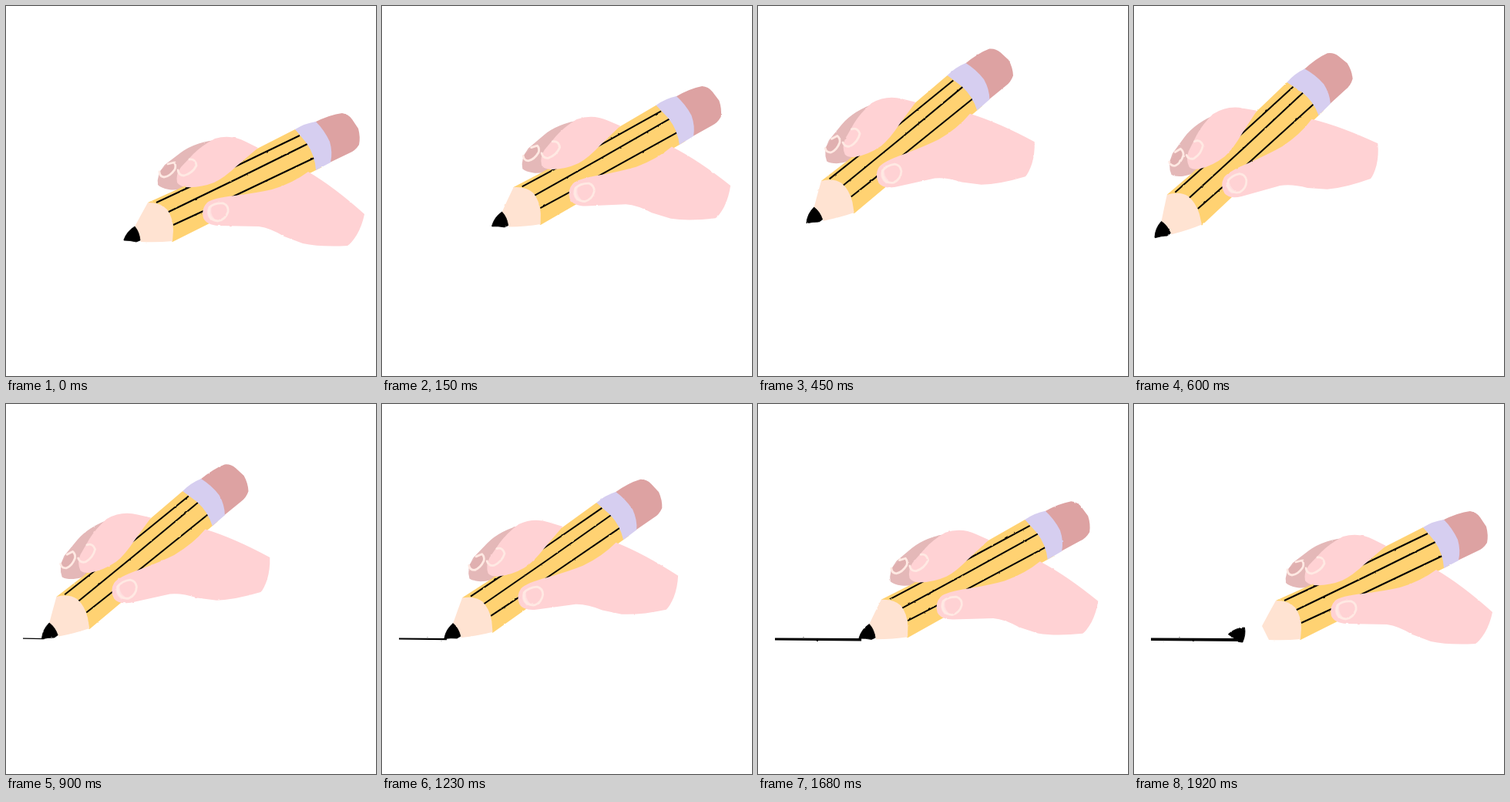
An HTML page for the animation above (2700 ms loop, 480 by 480 pixels).

```html
<!DOCTYPE html>
<html lang="en">
<head>
<meta charset="utf-8">
<title>Pencil line</title>
<style>
  html, body { margin: 0; width: 100%; height: 100%; overflow: hidden; background: #fff; }
  svg { display: block; width: 100vw; height: 100vh; }
  .skin { fill: #ffd2d4; }
  .nail { fill: none; stroke: #ffe9e3; stroke-width: 2.8; stroke-linecap: round; stroke-linejoin: round; }
</style>
</head>
<body>
<svg viewBox="0 0 480 480">
  <filter id="rough" filterUnits="userSpaceOnUse" x="0" y="0" width="480" height="480" color-interpolation-filters="sRGB">
    <feTurbulence type="fractalNoise" baseFrequency=".16" numOctaves="2" seed="4"/>
    <feDisplacementMap in="SourceGraphic" scale="1.8" xChannelSelector="R" yChannelSelector="G"/>
  </filter>
  <g filter="url(#rough)">
    <path id="line"/>
    <g id="hand">
      <!-- middle finger -->
      <path fill="#e4b8b8" d="M197 232Q195 219 206 206L227 190Q246 176 278 173L262 226L238 234Q224 240 211 238Q201 236 197 232Z"/>
      <path class="nail" style="fill:#e0b0b0" d="M210 205L218 203Q221 207 219 212Q213 221 205 222Q199 221 199 215"/>
      <!-- pencil -->
      <path fill="#ffd272" d="M184 255L222 238L375 160L396 172L410 209L402 213L216 306L196 290Z"/>
      <path fill="none" stroke="#000" stroke-width="2" d="M195 255L240 234L300 207L381 168M209 268L300 224L391 179M217 284L256 266L297 246L400 197"/>
      <path fill="#ffe3d2" d="M184 255Q201 255 209 264Q217 275 217 291L216 305Q197 307 175 306L166 288Q175 271 184 255Z"/>
      <path fill="#dda2a2" d="M400 151Q420 141 436 139Q444 140 449 147L457 159Q460 170 458 180Q453 188 445 191L420 203Z"/>
      <path fill="#d6cef0" d="M375 160Q388 152 402 150Q413 161 420 176Q424 190 421 203L402 213Q401 194 390 178Z"/>
      <!-- index finger, thumb and palm -->
      <path class="skin" d="M222 229Q220 218 227 209L243 192Q254 181 271 172Q292 166 311 176L327 184L300 207Q283 223 270 229Q252 236 234 235Q225 234 222 229Z"/>
      <path class="skin" d="M256 275Q253 263 261 255Q268 249 297 246Q328 242 345 238Q372 230 392 215Q426 235 465 270Q462 285 455 297Q448 308 443 311Q408 313 385 308L361 299Q343 288 328 286L276 285Q260 284 256 275Z"/>
      <path fill="#ffdfe0" d="M264 259Q257 268 265 278L271 277Q263 268 268 258Z"/>
      <path class="nail" d="M238 199Q246 198 247 207Q242 217 231 220Q224 220 223 213"/>
      <path class="nail" d="M264 261Q271 255 282 256Q289 259 288 267Q285 277 275 279Q264 278 263 268Z"/>
    </g>
    <path id="lead" stroke="#000" stroke-width=".8" stroke-linejoin="round" d="M153 303Q157 292 167 286Q173 293 174 304L169 306Q161 304 153 304Z"/>
  </g>
</svg>
<script>
const LOOP = 2700, TICK = 30;
const LIFT = 60, LAND = 630, ARRIVE = 1870, SNAP = 1740, REST = 1920;
const LEFT = 22, REACH = 131, TILT = 17.2;

const [line, hand, lead] = ["line", "hand", "lead"].map(id => document.getElementById(id));

const progress = (t, from, to) => Math.min(1, Math.max(0, (t - from) / (to - from)));
const smooth = u => u * u * (3 - 2 * u);
const mean = (a, b) => (a + b) / 2;

// The point hops left in an arc while the pencil tilts up.
function hop(u) {
  return {
    x: LEFT + REACH * (1 - mean(u ** 1.3, smooth(u))),
    y: 303 + u - 30 * Math.sin(Math.PI * u ** 0.85),
    angle: -TILT * mean(u, Math.sin(u * Math.PI / 2))
  };
}

// The point runs right along the line while the pencil leans back.
function stroke(u) {
  return { x: LEFT + REACH * u ** 1.1, y: 304 - u, angle: -TILT * (1 - u) };
}

// The broken lead falls back onto the line.
function tumble(u) {
  return { x: 149 - 14 * u, y: 298 + u - 4 * Math.sin(Math.PI * u), angle: 31 * u - 2 };
}

function place(el, { x, y, angle }, px, py) {
  el.setAttribute("transform", `translate(${x} ${y}) rotate(${angle}) translate(${-px} ${-py})`);
}

function linePath(x, u) {
  const width = 0.5 + 3.5 * u;
  const end = Math.min(x + 3, 139);
  return `M${LEFT} 303.6L${end} 304v${width}L${LEFT} ${303.6 + width * 0.85}Z`;
}

function draw(now) {
  const t = Math.floor(now % LOOP / TICK) * TICK;
  const u = progress(t, LAND, ARRIVE);
  const pose = t < LAND ? hop(progress(t, LIFT, LAND)) : stroke(u);
  place(hand, pose, 153, 303);
  if (t > SNAP) place(lead, tumble(progress(t, SNAP, REST)), 164, 298);
  else place(lead, pose, 153, 303);
  line.setAttribute("d", t > LAND ? linePath(pose.x, u) : "");
}

const start = performance.now();
function loop() {
  draw(performance.now() - start);
  requestAnimationFrame(loop);
}
loop();
</script>
</body>
</html>
```
